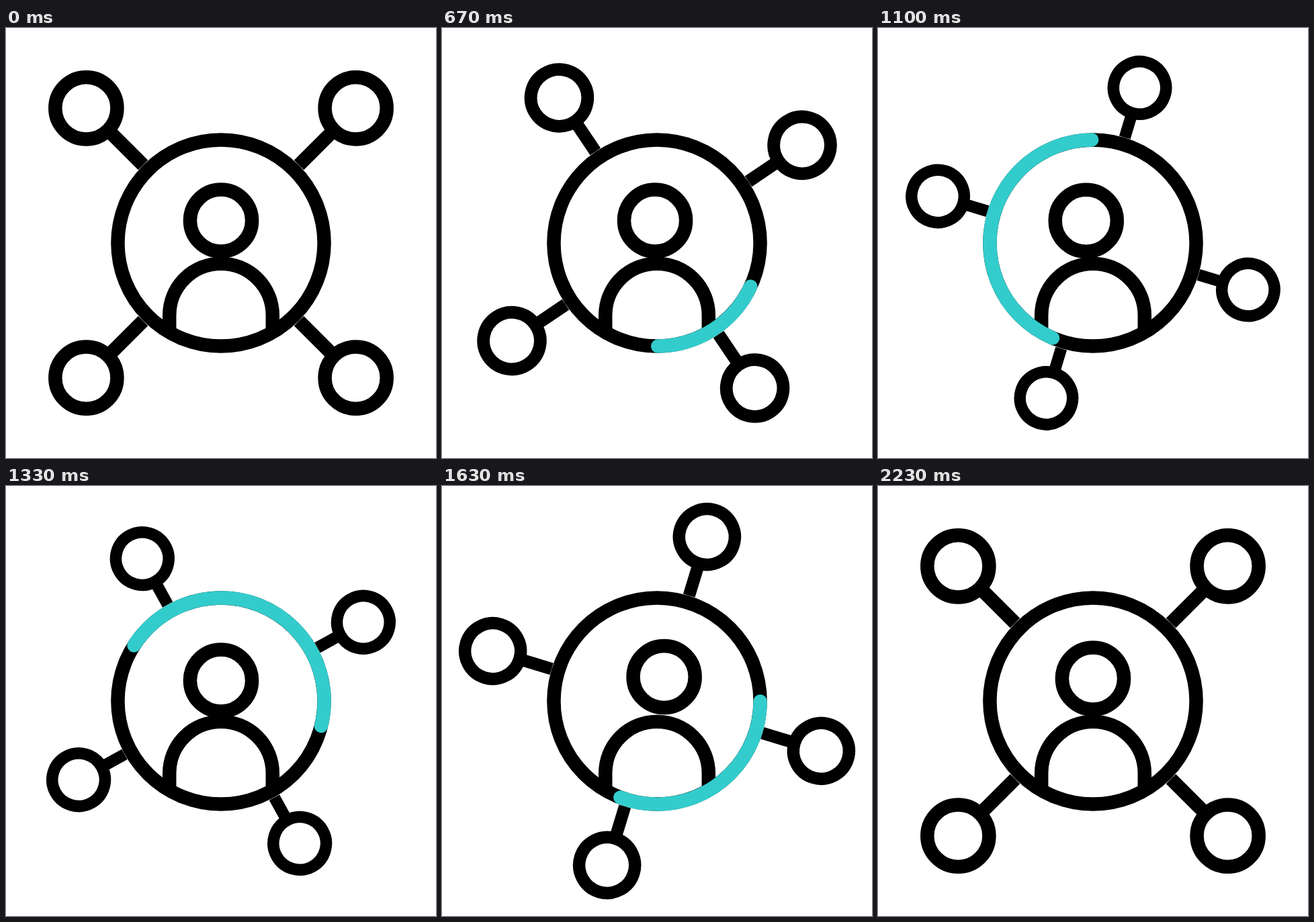
Write an HTML page that moves like this. It is 640x640 px and loops after 2500 ms.

```html
<!DOCTYPE html>
<html lang="en">
<head>
<meta charset="utf-8">
<title>Network</title>
<style>
  html, body { margin: 0; width: 100%; height: 100%; overflow: hidden; background: #fff; }
  svg { display: block; width: 100vw; height: 100vh; }
</style>
</head>
<body>
<svg viewBox="0 0 640 640" fill="none" stroke="#000" stroke-width="20.48">
  <g id="satellites"></g>
  <circle cx="320" cy="320" r="153.6"/>
  <path d="M243.2 450V427.5a76.8 76.8 0 0 1 153.6 0V450"/>
  <circle id="head" cx="320" cy="286.5" r="46.08"/>
  <path id="arc" stroke="#33cccc" stroke-linecap="round"/>
</svg>
<script>
const LOOP = 2500, FPS = 30;
const CENTER = 320, RING = 153.6, RIM = 164, ORBIT = 283.75, NODE = 46.08;
const byId = id => document.getElementById(id);
const satellites = byId('satellites'), head = byId('head'), arc = byId('arc');

satellites.innerHTML = [45, 135, 225, 315].map(angle =>
  `<g transform="rotate(${angle})"><path/><circle cx="${ORBIT}" r="${NODE}"/></g>`).join('');
const spokes = satellites.querySelectorAll('path');

const bezier = (t, p1, p2) => 3 * p1 * t * (1 - t) ** 2 + 3 * p2 * t * t * (1 - t) + t ** 3;

// Progress from 0 to 1 between two frames, eased by cubic-bezier(a, 0, b, 1).
function ease(frame, from, to, a = 0.53, b = 0.47) {
  const x = (frame - from) / (to - from);
  if (x <= 0) return 0;
  if (x >= 1) return 1;
  let low = 0, high = 1;
  for (let i = 0; i < 30; i++) {
    const mid = (low + high) / 2;
    if (bezier(mid, a, b) < x) low = mid; else high = mid;
  }
  return bezier(low, 0, 1);
}

function drawSatellites(frame, turn) {
  const scale = 1 - 0.15 * (ease(frame, 8, 31) - ease(frame, 36, 67));
  satellites.setAttribute('transform',
    `translate(${CENTER} ${CENTER}) rotate(${turn}) scale(${scale})`);
  // The inner end of each spoke stays on the rim of the ring.
  spokes.forEach(spoke => spoke.setAttribute('d', `M${RIM / scale} 0H${ORBIT - NODE}`));
}

function drawHead(frame) {
  const left = ease(frame, 13, 31), swing = ease(frame, 31, 49), back = ease(frame, 49, 58);
  const x = 10.6 * (2 * swing - left - back);
  const y = 17 * swing * (1 - swing) - 2.5 * (swing - back);
  head.setAttribute('transform', `translate(${x} ${y})`);
}

function ringPoint(degrees) {
  const angle = degrees * Math.PI / 180;
  return `${CENTER + RING * Math.cos(angle)} ${CENTER + RING * Math.sin(angle)}`;
}

function drawArc(frame, turn) {
  const base = 13.9 + turn, travel = 306;
  const start = base + travel * ease(frame, 20.6, 61.3, 0.515, 0.79);
  const end = base + travel * ease(frame, 13.15, 50, 0.05, 0.745);
  const large = end - start > 180 ? 1 : 0;
  arc.setAttribute('d', end - start < 0.01 ? '' :
    `M${ringPoint(start)}A${RING} ${RING} 0 ${large} 1 ${ringPoint(end)}`);
}

function render(time) {
  // Frames start on multiples of 10 ms.
  const tick = Math.floor((time % LOOP) / 10) * 10;
  const frame = Math.floor((tick + 5) * FPS / 1000);
  const turn = 180 * ease(frame, 8, 67);
  drawSatellites(frame, turn);
  drawHead(frame);
  drawArc(frame, turn);
}

const began = performance.now();
function loop() {
  render(performance.now() - began);
  requestAnimationFrame(loop);
}
loop();
</script>
</body>
</html>
```
